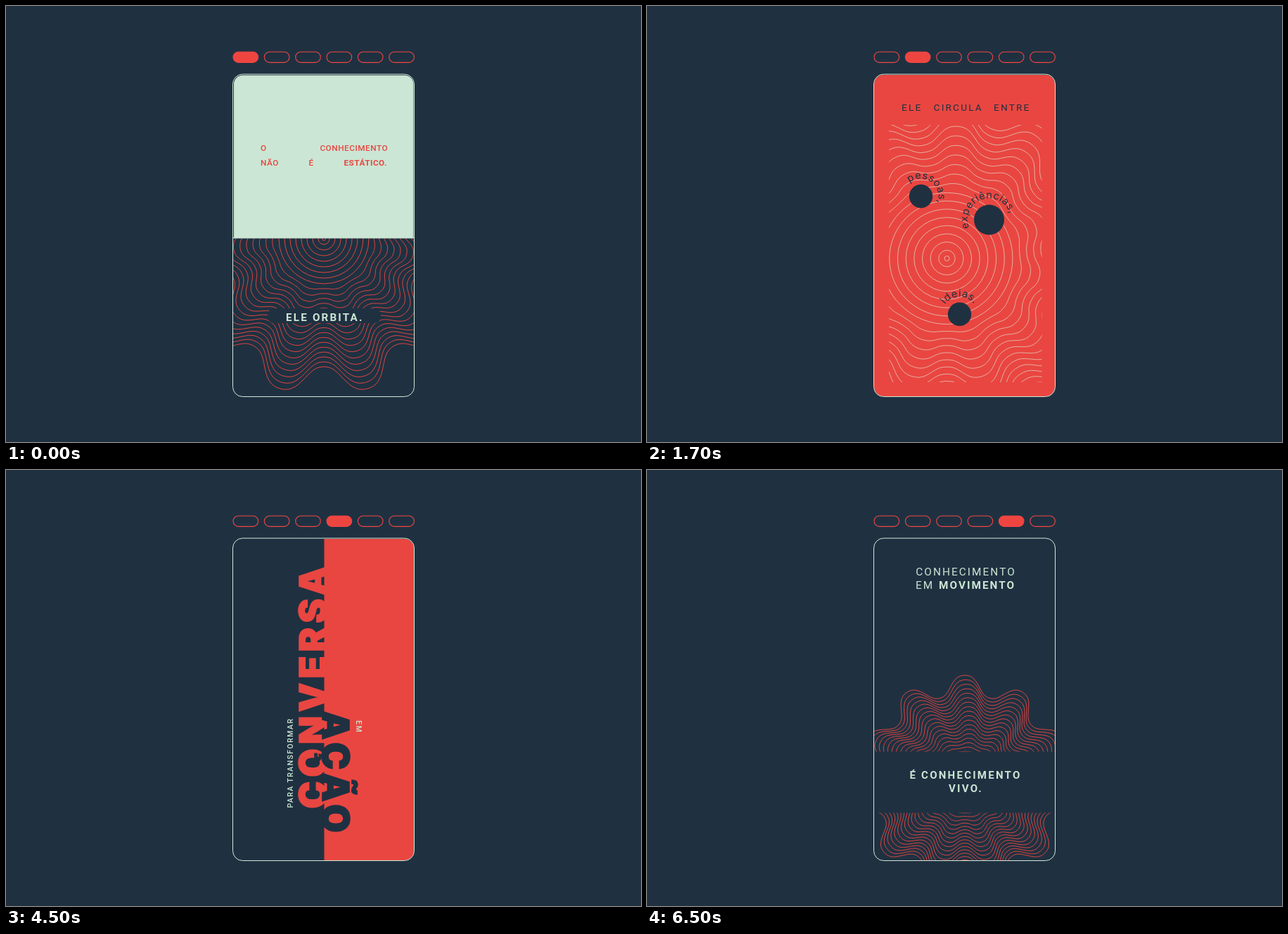
An HTML page that plays this animation: 903 by 620 pixels, repeating every 8000 ms.

```html
<!DOCTYPE html>
<html lang="pt">
<head>
<meta charset="utf-8">
<style>
html, body { margin: 0; width: 100%; height: 100%; overflow: hidden; background: #1f3141; }
svg { display: block; width: 903px; height: 620px; }
text { font-family: Roboto, Inter, sans-serif; white-space: pre; }
.mono { font: 18px "Liberation Mono", "DejaVu Sans Mono", monospace; letter-spacing: 1.35px; fill: #ef4541; }
.mono .em { font-weight: 700; font-style: italic; }
.huge { font: 900 52px Inter, sans-serif; letter-spacing: 6.1px; stroke-width: 1.6px; }
.orbit { font: 14.5px Inter, sans-serif; letter-spacing: 0.6px; }
.slide { visibility: hidden; }
</style>
</head>
<body>
<svg id="stage" viewBox="0 0 903 620" xmlns="http://www.w3.org/2000/svg">
  <defs>
    <clipPath id="card"><rect x="323" y="98" width="257" height="457" rx="13.2"/></clipPath>
    <clipPath id="field"><rect x="344" y="169" width="217.5" height="366"/></clipPath>
  </defs>
  <g id="pills" stroke="#ef4541" stroke-width="1.1"></g>
  <g id="slides" clip-path="url(#card)"></g>
  <rect x="322.5" y="97" width="258" height="458.5" rx="14" fill="none" stroke="#d3e9d9"/>
</svg>
<script>
const NAVY = '#1f3141', RED = '#e94641', MINT = '#cbe6d4';
const LOOP = 8000;
const STARTS = [0, 500, 2500, 4500, 6500];
const ROUND = 8, RINGS = 25;
const byId = id => document.getElementById(id);

// Concentric rings: circles near the middle, then growing into an 11-lobed flower.
function ring(k, scale) {
  if (k <= ROUND) return circlePath(scale * (k ? 8 * k : 2.4));
  const t = (k - ROUND) / (RINGS - ROUND);
  const n = 360;
  let d = '';
  for (let i = 0; i < n; i++) {
    const a = i / n * 2 * Math.PI;
    const twist = 0.14 * (1 - t) * (1 + Math.cos(a)) / 2;
    const c = Math.cos(11 * (a - twist));
    const r = scale * (64 + 138 * t + 20 * t * c * (1.25 - 0.25 * c * c));
    d += (i ? 'L' : 'M') + (r * Math.sin(a)).toFixed(2) + ' ' + (-r * Math.cos(a)).toFixed(2);
  }
  return d + 'Z';
}

function circlePath(r) {
  return `M0 ${-r}A${r} ${r} 0 1 1 0 ${r}A${r} ${r} 0 1 1 0 ${-r}Z`;
}

function flower(x, y, scale, color, width = 0.95, turn = 0) {
  let d = '';
  for (let k = 0; k <= RINGS; k++) d += ring(k, scale);
  return `<path transform="translate(${x} ${y}) rotate(${turn})" d="${d}" fill="none" stroke="${color}" stroke-width="${width}"/>`;
}

function rect(x, y, w, h, fill, rx = 0) {
  return `<rect x="${x}" y="${y}" width="${w}" height="${h}" rx="${rx}" fill="${fill}"/>`;
}

function label(str, x, y, size, weight, gap, fill, turn = 0) {
  return `<text transform="translate(${x} ${y}) rotate(${turn})" font-size="${size}" font-weight="${weight}" letter-spacing="${gap}" fill="${fill}">${str}</text>`;
}

// A dot with a word running clockwise around it, starting at an angle from the top.
function orbit(id, str, x, y, dot, r, from) {
  const a = from * Math.PI / 180;
  const sx = r * Math.sin(a), sy = -r * Math.cos(a);
  return `<g transform="translate(${x} ${y})" fill="${NAVY}">
    <path id="${id}" d="M${sx} ${sy}A${r} ${r} 0 0 1 ${-sx} ${-sy}A${r} ${r} 0 0 1 ${sx} ${sy}" fill="none"/>
    <circle r="${dot}"/>
    <text class="orbit"><textPath href="#${id}">${str}</textPath></text>
  </g>`;
}

const mono = (str, x, y) => `<text class="mono" x="${x}" y="${y}">${str}</text>`;
const em = str => `<tspan class="em">${str}</tspan>`;
const huge = (str, x, y, turn, fill) =>
  `<text class="huge" transform="translate(${x} ${y}) rotate(${turn})" fill="${fill}" stroke="${fill}">${str}</text>`;

const slides = [
  flower(452, 331, 1, RED) +
  rect(322, 96, 260, 234.3, NAVY) +
  `<path d="M324 330.3V111a12.5 12.5 0 0 1 12.5 -12.5H567a12.5 12.5 0 0 1 12.5 12.5V330.3Z" fill="${MINT}"/>` +
  rect(323, 329, 257, 1.3, MINT) +
  label('O', 362, 206.4, 11.8, 500, 0.5, RED) +
  label('CONHECIMENTO', 446.4, 206.4, 11.8, 500, 0.5, RED) +
  label('NÃO', 362, 227.4, 11.8, 500, 0.5, RED) +
  label('É', 430.4, 227.4, 11.8, 500, 0.5, RED) +
  label('ESTÁTICO.', 480.4, 227.4, 11.8, 700, 0.5, RED) +
  rect(372, 430, 161, 21, NAVY, 9) +
  label('ELE ORBITA.', 398, 447.6, 15.2, 700, 2.2, MINT),

  rect(322, 96, 260, 460, RED) +
  `<g clip-path="url(#field)">${flower(426.5, 359, 1.46, '#e3d3c2', 0.75)}</g>` +
  label('ELE', 362, 148.8, 13.6, 400, 2.2, NAVY) +
  label('CIRCULA', 407.6, 148.8, 13.6, 400, 2.2, NAVY) +
  label('ENTRE', 493, 148.8, 13.6, 400, 2.2, NAVY) +
  orbit('people', 'pessoas,', 389.5, 270.5, 16.7, 25, -40) +
  orbit('lived', 'experiências,', 486.5, 304, 21.5, 30.5, -112) +
  orbit('ideas', 'ideias.', 444.5, 438.3, 16.7, 25, -56),

  flower(324.5, 333, 0.482, MINT) +
  flower(580, 329, 0.482, MINT, 0.95, 180) +
  mono('O ' + em('Lunapapos') + ' é o', 361, 212) +
  mono('espaço', 416, 232.7) +
  mono('para ' + em('provocar') + '.', 367, 458.6),

  rect(452.5, 96, 130, 460, RED) +
  huge('CONVERSA', 455.3, 481.5, -90, RED) +
  huge('AÇÃO', 449.5, 342.3, 90, NAVY) +
  label('PARA TRANSFORMAR', 408, 480.5, 10.5, 500, 1.45, MINT, -90) +
  label('EM', 498, 356, 10.5, 500, 1.45, MINT, 90),

  flower(452, 444, 0.685, RED) +
  rect(322, 400.5, 260, 87, NAVY) +
  label('CONHECIMENTO', 382.3, 150.3, 15.3, 400, 2.1, MINT) +
  label('EM', 382, 169, 15.3, 400, 2.1, MINT) +
  label('MOVIMENTO', 415, 169, 15.3, 700, 2.05, MINT) +
  label('É CONHECIMENTO', 373.4, 438.5, 15, 700, 2.25, MINT) +
  label('VIVO.', 429, 457.6, 15, 700, 2.25, MINT)
];

byId('slides').innerHTML = slides.map(s => `<g class="slide">${s}</g>`).join('');
byId('pills').innerHTML = Array.from({ length: 6 }, (_, i) =>
  `<rect x="${323 + 44.35 * i}" y="65.2" width="35.6" height="15.2" rx="7.6" fill="none"/>`).join('');

const pages = [...document.querySelectorAll('.slide')];
const pills = [...byId('pills').children];

function draw() {
  const t = performance.now() % LOOP;
  const now = STARTS.filter(s => s <= t).length - 1;
  pages.forEach((p, i) => { p.style.visibility = i === now ? 'visible' : 'hidden'; });
  pills.forEach((p, i) => p.setAttribute('fill', i === now ? '#ef4541' : 'none'));
  requestAnimationFrame(draw);
}
draw();
</script>
</body>
</html>
```
